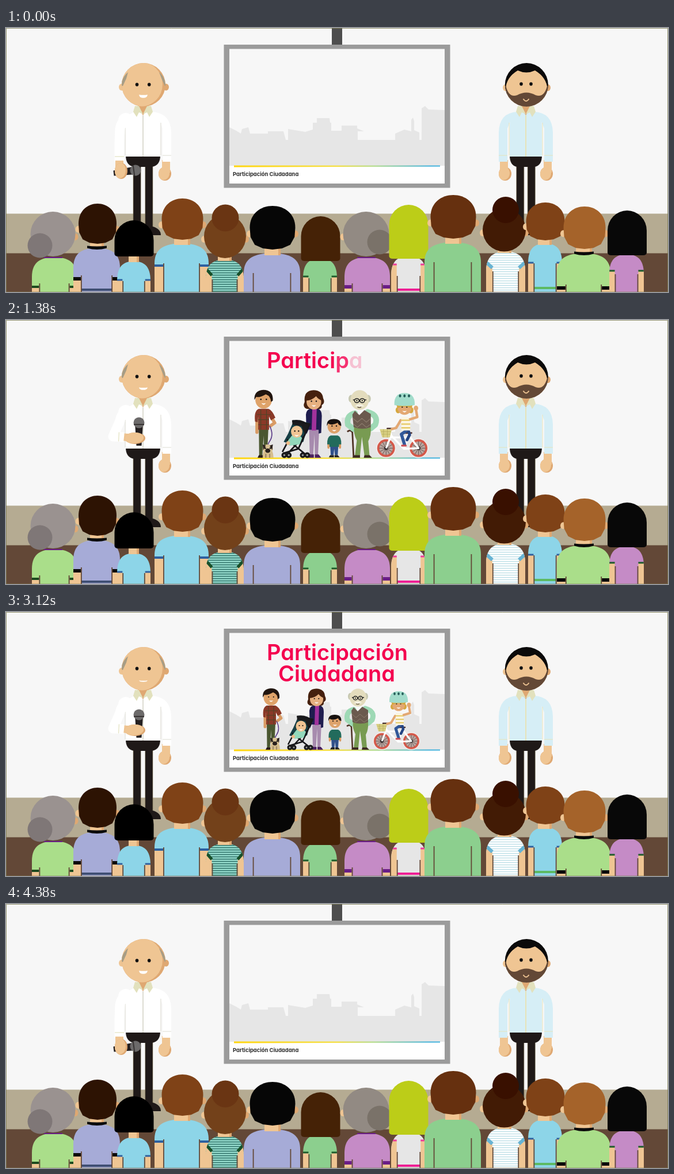
Animation, 1150 px wide and 460 px high, one loop 4.5 s. Source, as an HTML page with a canvas:

```html
<!DOCTYPE html>
<html lang="es">
<head>
<meta charset="utf-8">
<title>Participación Ciudadana</title>
<style>
html, body { margin: 0; width: 100%; height: 100%; overflow: hidden; background: #f7f7f7; }
canvas, svg { position: absolute; left: 0; top: 0; width: 1150px; height: 460px; }
text { font-family: Inter, "Open Sans", sans-serif; font-weight: 700; font-feature-settings: "cv11"; }
#title text { font-size: 38px; font-weight: 600; text-anchor: middle; fill: #f4004f; }
</style>
</head>
<body>
<canvas width="1150" height="460"></canvas>
<svg viewBox="0 0 1150 460">
  <text x="394" y="258" font-size="9.4" fill="#2b2b2b">Participación Ciudadana</text>
  <g id="title">
    <text x="575.5" y="83.5"></text>
    <text x="574.5" y="120.5"></text>
  </g>
</svg>
<script>
const ctx = document.querySelector('canvas').getContext('2d');
const title = document.getElementById('title');
const LOOP = 4500, STEP = 30;
const SKIN = '#efc593', SHADE = '#dfa872', FLOOR = '#634837', DARK = '#1f1918', WALL = '#f7f7f7';

const clamp = v => Math.max(0, Math.min(1, v));
const mix = (a, b, k) => a + (b - a) * k;

// Piecewise linear value through [time, value] pairs.
function track(t, keys) {
  if (t <= keys[0][0]) return keys[0][1];
  for (let i = 1; i < keys.length; i++) {
    const [t0, v0] = keys[i - 1], [t1, v1] = keys[i];
    if (t <= t1) return mix(v0, v1, (t - t0) / (t1 - t0));
  }
  return keys[keys.length - 1][1];
}

function fill(color, d) {
  ctx.fillStyle = color;
  ctx.fill(new Path2D(d));
}
function line(color, width, d, cap = 'butt') {
  ctx.strokeStyle = color;
  ctx.lineWidth = width;
  ctx.lineCap = cap;
  ctx.lineJoin = 'round';
  ctx.stroke(new Path2D(d));
}
function box(color, x, y, w, h) {
  ctx.fillStyle = color;
  ctx.fillRect(x, y, w, h);
}
function oval(color, x, y, rx, ry = rx) {
  ctx.fillStyle = color;
  ctx.beginPath();
  ctx.ellipse(x, y, rx, ry, 0, 0, 7);
  ctx.fill();
}
function clipped(d, draw) {
  ctx.save();
  ctx.clip(new Path2D(d));
  draw();
  ctx.restore();
}
const ovalPath = (x, y, rx, ry) =>
  `M${x - rx} ${y}a${rx} ${ry} 0 1 1 ${2 * rx} 0a${rx} ${ry} 0 1 1 ${-2 * rx} 0Z`;

// ---------- room and screen ----------
function room() {
  box(WALL, 0, 0, 1150, 324);
  box('#b5ab92', 0, 323.5, 1150, 70);
  box(FLOOR, 0, 392.5, 1150, 68);
  box('#4e4e4e', 566, 0, 18, 30);
  box('#9b9b9b', 378.5, 29, 393, 249.5);
  box(WALL, 388, 36.5, 374, 234.5);
  fill('#e6e6e6', `M388 173L400 179 408 184 410 176 421 173 424 184H455V180H482L486 195H490V176L520 181
    533 177V165H540V157H562L563 165H565V179H583V170H610V175L622 180H611V195H676V184L692 177 704 180V160
    L707 156 709 162V178L718 182V195H722V140L728 136 734 142 762 143V241H388Z`);
  box('#fff', 388, 240, 374, 31);
  const g = ctx.createLinearGradient(396, 0, 754, 0);
  g.addColorStop(0, '#ffd60f');
  g.addColorStop(0.5, '#f5e04d');
  g.addColorStop(0.68, '#b6dd90');
  g.addColorStop(0.95, '#45b3dc');
  fill(g, 'M396 239.5H754V241.5L396 242.5Z');
}

// ---------- family on the screen ----------
function smallFace(x, y, r, skin) {
  oval(skin, x, y, r, r * 1.05);
  oval('#111', x - r * .33, y - 1, 1.1);
  oval('#111', x + r * .33, y - 1, 1.1);
  fill('#fff', `M${x - 3.5} ${y + 5}q3.5 1 7 0q-3.5 5 -7 0`);
}

function dogWalker() {
  fill('#4a5730', 'M453 193H468L466 237H461L460.5 205 458.5 237H453.5Z');
  fill('#2a1c18', 'M453 236H460V240H451ZM461 236H466L470 240H461Z');
  line('#d99b64', 5, 'M450 180V200M473 177L478 185 471 190', 'round');
  fill('#8a3928', 'M453 163H468Q474 165 479 177L472 181 469 175V196H452V175L451 184 447 183Q445 166 453 163Z');
  line('#4c4427', 1, 'M456 164V196M465 164V196M450 172H472M452 180H469M452 188H469');
  smallFace(460.5, 149, 13, '#dfa36a');
  fill('#21150f', 'M446 149Q445 134 460 133 476 133 475 150L472 152Q472 143 464 140 453 146 449 144Z');
  line('#5b3b88', 1.5, 'M470 190Q477 204 470 214 466 220 467 226');
  fill('#d5bd8d', 'M459 240Q459 225 467 222 476 227 476 240Z');
  oval('#d9c394', 467, 226, 8, 7);
  fill('#2a211d', 'M459 219L464 221 460 228ZM475 219L470 221 474 228Z');
  oval('#2a211d', 467, 229, 4, 3.5);
  oval('#111', 463, 225, 1.3);
  oval('#111', 471, 225, 1.3);
  line('#6d5a45', 1, 'M464 234V240M470 234V240');
}

function mother() {
  fill('#a78bae', 'M532 193H548L546 236H541L540.5 203 538.5 236H533Z');
  fill('#4b225f', 'M532 235H539.5V240H529ZM541 235H547L551 240H541Z');
  fill('#46210f', `M528 163Q521 160 525 152 523 134 539 133.5 553 134 554 146 558 154 552 157 553 164 544 164Z`);
  fill('#1e1c4e', 'M534 163H546Q552 165 552 174L551 201 547 202V196H531L528 203 527 172Q528 164 534 163Z');
  fill('#a0329c', 'M537 163H544L543 197H536Z');
  smallFace(539.5, 152, 11.5, '#e6b080');
  fill('#46210f', 'M527 150Q529 138 540 139 552 140 553 150 546 148 543 143 536 150 527 150Z');
}

function stroller() {
  fill('#173f45', 'M506 186L531 184 523 215 507 220 492 215 499 202Z');
  fill('#1b1b1d', 'M505 181Q522 178 533 189L526 204 520 190 506 188Z');
  line('#17171a', 2.5, 'M506 182L533 187 515 226 492 233M497 211L528 236M524 206L496 236M490 231L499 214');
  fill('#92d8bb', 'M505 205Q515 201 521 209L517 219 501 221 498 214Z');
  oval('#edb988', 499, 217, 3);
  smallFace(512.5, 199, 9, '#f0c493');
  for (const x of [493, 500, 522, 529]) {
    oval('#19191b', x, 236, 4.5);
    oval('#999', x, 236, 1.5);
  }
}

function boy() {
  fill('#30518a', 'M565 220H578L577 236H572.5L571.5 226 570.5 236H566Z');
  fill('#222', 'M565 236H571V239.5H563ZM572 236H577L580 239.5H572Z');
  line('#d99b64', 3.5, 'M562.5 217V224M580.5 217V224', 'round');
  fill('#226b5c', 'M566 205H577Q583 207 582.5 219H579V223H564V219H560.5Q560 207 566 205Z');
  smallFace(571.5, 191, 10.5, '#dda26b');
  fill('#17120f', 'M560 190Q559 179 571 179 583 179 582.5 190 578 189 577 185 568 190 562 186Z');
}

function oldMan() {
  line('#4c3022', 2.5, 'M592 199Q597 195 600 200L602 240');
  line('#9ed9b5', 9, 'M604 170Q590 173 593 188L602 195M624 168Q642 173 636 188L629 194', 'round');
  fill('#789b52', 'M603 191H629Q630 205 625 214L627 237H619L615 207 612 237H604L607 213Q601 201 603 191Z');
  fill('#3c2b22', 'M603 236H612V240H600ZM619 236H627L631 240H618Z');
  fill('#6b5a4e', 'M604 166L611 173 619 165 629 171V192Q616 197 602 192L600 172Z');
  line('#8d7c6d', 1, 'M601 178L608 184 615 178 622 184 629 178M602 187L608 192 615 186 622 192 629 187');
  oval('#c7c8b1', 598, 147, 4, 6);
  oval('#c7c8b1', 625, 147, 4, 6);
  oval('#e3dcbd', 611.5, 149, 14.5, 15.5);
  line('#222', 1.4, ovalPath(607, 150, 3.7, 3.2) + ovalPath(615.5, 150, 3.7, 3.2) + 'M601 149H603M619 149H622');
  oval('#111', 607, 150, 1);
  oval('#111', 615.5, 150, 1);
  fill('#f4f1e4', 'M604 159Q611 152 619 159 611 159 604 159Z');
  line('#4b3a30', 1, 'M608 160Q611 162 614 160');
}

function cyclist() {
  for (const x of [653, 704]) {
    oval('#f2ecea', x, 225, 15.5);
    oval('#d5594a', x, 225, 14);
    oval('#b9a6a0', x, 225, 10.5);
    for (let a = 0; a < 6; a++) {
      const dx = 11 * Math.cos(a * Math.PI / 6), dy = 11 * Math.sin(a * Math.PI / 6);
      line('#5d4c49', .8, `M${x - dx} ${225 - dy}L${x + dx} ${225 + dy}`);
    }
    oval('#3a3030', x, 225, 3);
  }
  line('#fff', 3, 'M653 225L661 205 681 226 704 225 689 205 681 226M661 205L659 196M661 208H689L687 201');
  line('#4a3030', 2.5, 'M655 194H663M682 201H693', 'round');
  fill('#d9d083', 'M643 195H662L659 208H647Z');
  line('#b4aa5d', .7, 'M645 199H661M646 203H660M649 195V208M655 195V208');
  line('#315899', 5, 'M686 197L677 203 682 219', 'round');
  line('#244583', 4.5, 'M688 197L690 204 686 212', 'round');
  line('#c94d55', 3, 'M678 221H684', 'round');
  oval('#d5a73f', 672, 165, 4, 5);
  oval('#d5a73f', 692, 165, 4, 5);
  line('#e3a873', 4, 'M676 181L669 193 662 195M689 180L702 176 700 164', 'round');
  oval('#e3a873', 700, 162, 3.5, 4);
  fill('#fbf4df', 'M677 176H687Q692 181 691 197H677Z');
  line('#e0bd43', 1.6, 'M677 181H690M677 187H691M677 193H691');
  smallFace(682, 161, 11, '#e3a873');
  fill('#d5a73f', 'M669 156H695L693 162Q681 156 671 162Z');
  fill('#a2dccb', 'M666 157Q665 138 682 138 699 138 698 157Q682 160 666 157Z');
  for (const x of [675, 682, 689]) oval('#245c58', x, 142.5, 1.8, 2.4);
}

function family(t) {
  const u = clamp((t - 4080) / 300);
  const s = t < 3000
    ? track(t, [[1200, 0], [1290, .847], [1350, 1.14], [1470, 1]])
    : 1 - u * u;
  if (s <= 0) return;
  ctx.save();
  ctx.translate(584, 241);
  ctx.scale(s, s);
  ctx.translate(-584, -241);
  [dogWalker, mother, stroller, boy, oldMan, cyclist].forEach(draw => draw());
  ctx.restore();
}

// ---------- speakers ----------
function eyes(xs, y, t, start) {
  const open = [.5, .12, .5][(t - start) / STEP] || 1;
  for (const x of xs) oval('#111', x, y, 2.8, 3.1 * open);
}

function hand(x, y, rx = 11, ry = 12) {
  oval(SHADE, x, y, rx, ry);
  clipped(ovalPath(x, y, rx, ry), () => oval(SKIN, x - 3, y - 1, rx, ry));
}

// Body from collar to shoes, w is half its width; the left arm is optional.
function speaker(c, w, shirt, trim, leftArm) {
  const hip = w - 19, leg = w * .345;
  for (const x of [c - leg, c + leg - 13]) {
    box(DARK, x, 235, 13, 118);
    line('#6d6243', .6, `M${x} 240V353M${x + 13} 240V353`);
  }
  fill(DARK, `M${c + 4} 346H${c + 17}Q${c + 31} 350 ${c + 31} 361H${c + 4}Z`);
  fill(DARK, `M${c - hip} 222H${c + hip}Q${c + hip} 240 ${c + 15} 242H${c - 15}Q${c - hip} 240 ${c - hip} 222Z`);
  for (const k of leftArm ? [-1, 1] : [1]) {
    hand(c + (w - 11) * k, 254);
    box(SKIN, c + (w - 9) * k - 7, 230, 14, 22);
    fill(shirt, `M${c + 14 * k} 146Q${c + (w - 1) * k} 147 ${c + w * k} 182V233H${c + (w - 15) * k}V175L${c + hip * k} 165Z`);
    line(trim, 1, `M${c + (w - 15) * k} 222H${c + w * k}`);
  }
  fill(shirt, `M${c - 12} 146H${c + 12}Q${c + hip} 148 ${c + hip} 172V224H${c - hip}V172Q${c - hip} 148 ${c - 12} 146Z`);
  line(trim, 1, `M${c - hip - 1} 165V222M${c + hip + 1} 165V222`);
  line(trim, 2, `M${c} 152V224`);
  fill(SHADE, `M${c - 9} 128H${c + 9}V140L${c} 152 ${c - 9} 140Z`);
  fill('#e2e1bd', `M${c - 14} 136L${c - 7} 136 ${c} 150 ${c - 7} 147 ${c - 11} 155 ${c - 17} 146Z
    M${c + 14} 136L${c + 7} 136 ${c} 150 ${c + 7} 147 ${c + 11} 155 ${c + 17} 146Z`);
}

// elbow, wrist, hand, hand radii, mic tail, mic head
const POSES = [
  [197, 200, 197, 233, 200, 249, 11, 14, 187, 253, 225, 248],
  [192, 212, 202, 232, 214, 242, 14, 12, 207, 251, 237, 230],
  [186, 203, 205, 204, 224, 206, 18, 10, 231, 219, 231, 179]
];

function micArm(t) {
  const p = track(t, [[930, 0], [1050, 1], [1140, 2], [4080, 2], [4170, 1], [4350, 0]]);
  const i = Math.min(1, Math.floor(p));
  const [ex, ey, wx, wy, hx, hy, rx, ry, tx, ty, mx, my] =
    POSES[i].map((v, n) => mix(v, POSES[i + 1][n], p - i));
  line('#fff', 17, `M207 160Q199 166 198 176L${ex} ${ey} ${wx} ${wy}`);
  oval('#fff', 208, 161, 13, 13);
  const a = Math.atan2(my - ty, mx - tx);
  ctx.save();
  ctx.translate(mx, my);
  ctx.rotate(a);
  const len = Math.hypot(mx - tx, my - ty);
  fill('#241f20', `M0 -7L${-len} -4.5V4.5L0 7Z`);
  oval('#6c6a6a', 0, 0, 9.5);
  line('#383434', 2, 'M-3 -9V9');
  ctx.restore();
  if (p > .5) line(SKIN, 13, `M${wx} ${wy}L${hx} ${hy}`);
  else box(SKIN, wx - 7, wy - 2, 14, 14);
  hand(hx, hy, rx, ry);
  const dx = wx - ex, dy = wy - ey, d = Math.hypot(dx, dy);
  const cx = wx - dx / d * 9, cy = wy - dy / d * 9, nx = dy / d * 8, ny = -dx / d * 8;
  line('#e2e1bd', 1.2, `M${cx - nx} ${cy - ny}L${cx + nx} ${cy + ny}`);
}

function presenter(t) {
  speaker(238, 49, '#fff', '#dddcd2', false);
  micArm(t);
  oval(SKIN, 201, 103, 5, 6);
  oval(SHADE, 278, 103, 5, 6);
  const head = ovalPath(239, 99, 38, 38);
  fill(SHADE, head);
  clipped(head, () => {
    oval(SKIN, 234, 98, 38, 39);
    fill('#a79d85', 'M199 100Q203 84 212 77L209 88 203 101ZM278 100Q275 84 266 77L271 90 276 101Z');
  });
  eyes([227.5, 248.7], 98.5, t, t < 2000 ? 450 : 3240);
  const talking = t > 1137 && t < 3882;
  const open = talking ? (1 - Math.cos((t - 1290) / 305 * 2 * Math.PI)) / 2 : 1;
  const top = 119.3 - 3 * open;
  fill('#fff', `M231 ${top}Q238.5 ${top + 1} 246 ${top}Q245 121.8 238.5 121.8 232 121.8 231 ${top}Z`);
}

function colleague(t) {
  speaker(903, 47, '#d6eef6', '#e6e3b9', true);
  oval(SKIN, 868, 104, 5, 6);
  oval(SHADE, 941, 104, 5, 6);
  const head = ovalPath(904.3, 99, 37.5, 38);
  fill('#0b0a0a', head);
  clipped(head, () => {
    fill(SKIN, 'M868 106Q869 86 889 74Q904 81 919 74Q939 86 940.5 106L930 140H878Z');
    fill('#634836', 'M865 101L868.5 101Q873 122 888 117 904 108 920 117 935 122 940 101L944 101V140H866Z');
  });
  line(SKIN, 1.8, 'M898.5 123.5Q903.5 131 908.5 123.5');
  eyes([895, 912], 97.5, t, t < 2000 ? 960 : 3660);
}

// ---------- audience ----------
function body(x, y, w, color, o = {}) {
  const a = w * .16, r = x + w, e = w * .36;
  const shape = `M${x} 462V${y + 34}C${x} ${y + 13} ${x + w * .12} ${y + 3} ${x + e} ${y}H${r - e}` +
    `C${r - w * .12} ${y + 3} ${r} ${y + 13} ${r} ${y + 34}V462Z`;
  fill(color, shape);
  clipped(shape, () => {
    if (o.stripe) for (let s = y + 2; s < 460; s += 4) box(o.stripe, x, s, w, 1.2);
    if (o.hem) box(o.hem, x + a, o.hemY || 454, w - 2 * a, 4);
    if (!o.cuff) return;
    const tilt = o.tilt || 0;
    for (const [out, inn] of [[x, x + a], [r, r - a]]) {
      fill(SKIN, `M${out} ${o.cuffY}L${inn} ${o.cuffY + tilt}V462H${out}Z`);
      line(o.cuff, o.thick || 4, `M${out} ${o.cuffY}L${inn} ${o.cuffY + tilt}`);
    }
  });
  const top = Math.max(y + 34, (o.cuffY || 0) - 6);
  box(FLOOR, x + a, top, 1.8, 460 - top);
  box(FLOOR, r - a - 1.8, top, 1.8, 460 - top);
}

function neck(x, y, h, w = 24) {
  box(SKIN, x - w / 2, y, w, h);
  box(SHADE, x + w / 2 - 4, y, 4, h);
}
function collar(x, y) {
  fill('#0b0b0b', `M${x - 17} ${y}Q${x} ${y + 2} ${x + 17} ${y}V${y + 4}Q${x} ${y + 9} ${x - 17} ${y + 4}Z`);
}
function ears(x, y, d, sides = [-1, 1]) {
  for (const k of sides) oval(k < 0 ? SKIN : SHADE, x + d * k, y, 5, 6);
}
// Short hair seen from behind.
function crop(color, x, y, rx, ry) {
  ears(x, y + ry * .28, rx + .5);
  fill(color, `M${x - rx} ${y}C${x - rx} ${y - ry * 1.33} ${x + rx} ${y - ry * 1.33} ${x + rx} ${y}
    L${x + rx * .97} ${y + ry * .42} ${x + rx * .78} ${y + ry * .78} ${x + rx * .42} ${y + ry * .95} ${x} ${y + ry}
    ${x - rx * .42} ${y + ry * .95} ${x - rx * .78} ${y + ry * .78} ${x - rx * .97} ${y + ry * .42}Z`);
}
// Long hair with a straight lower edge.
function bob(color, x, y, h) {
  fill(color, `M${x} ${y + h - 4}V${y + 35}a34 35 0 0 1 68 0V${y + h - 4}q-1 4 -6 4h-56q-5 0 -6 -4Z`);
}
function bun(hair, x, y, rx, ry, knot, bx, by, br, sides) {
  ears(x, y + 5, rx, sides);
  oval(hair, x, y, rx, ry);
  oval(knot, bx, by, br);
}

function handUp(pose) {
  if (pose === 1) {
    fill(SKIN, 'M494 404Q500 400 514 402L514 406 497 408Z');
    fill('#a6abd7', 'M496 405H513L510 413 497 413Z');
  } else {
    line(SKIN, 11, 'M506 396L502 318');
    line(SHADE, 3, 'M510 396L506 322');
    oval(SKIN, 501.5, 313, 8, 11);
    line('#a6abd7', 15, 'M497 420L505 388');
  }
}

function audience(t) {
  const raised = t >= 120 && t < 810 ? (t === 120 || t === 780 ? 1 : 2) : 0;

  body(45, 400, 78, '#aade8a', { cuff: '#1d4b1f', cuffY: 451 });
  line('#6a1d87', 2, 'M66 400H98');
  bun('#9a9290', 81.5, 359, 39, 39, '#7f7777', 59, 379, 21.5, [1]);

  body(117, 384, 81, '#a6abd7', { cuff: '#0b0b0b', cuffY: 437, thick: 6, hem: '#3f4f74', hemY: 454 });
  neck(158, 366, 16);
  collar(158, 379.5);
  crop('#2d1303', 159, 341, 33, 35);

  body(193, 407, 58, '#8dd5e8', { cuff: '#2e609f', cuffY: 439, thick: 3 });
  neck(222, 396, 12, 18);
  bob('#000', 188.5, 335, 63);

  body(258, 376, 94, '#8dd5e8', { cuff: '#2e609f', cuffY: 414 });
  neck(306, 362, 16, 28);
  crop('#7f4217', 306.5, 333, 36, 36);

  body(347, 404, 66, '#90d6c8', { stripe: '#22645c', cuff: '#17502a', cuffY: 419, tilt: 12, thick: 5 });
  neck(380, 394, 12);
  bun('#73411a', 380.5, 363, 36.5, 38, '#6a3513', 381, 331, 23.5);

  ctx.save();
  if (raised) ctx.clip(new Path2D('M0 0H498V460H0Z'));
  body(413, 393, 98, '#a6abd7');
  ctx.restore();
  neck(463, 376, 20, 28);
  crop('#060606', 463, 348, 39.5, 38);
  if (raised) handUp(raised);

  body(516, 402, 59, '#8ccf8e', { cuff: '#1d5c2c', cuffY: 433, thick: 3 });
  bob('#452206', 512.5, 328, 78);

  body(588, 400, 79, '#c58bc6', { cuff: '#6a1d87', cuffY: 451, thick: 6 });
  line('#6a1d87', 2, 'M610 400H642');
  bun('#928a83', 625.5, 359, 40, 39, '#7a7269', 649, 373, 21.5, [-1]);

  body(669, 398, 61, '#e6e6e6', { cuff: '#ee3b9b', cuffY: 412, thick: 3, hem: '#ee1f94' });
  bob('#bccd18', 665.5, 308, 94);

  body(727, 374, 98, '#8ccf8e');
  neck(777, 360, 16, 28);
  crop('#66300f', 777, 329, 39.5, 38);

  body(834, 390, 68, '#fff', { stripe: '#b5dbe3', cuff: '#67b3d3', cuffY: 408, tilt: 10, thick: 6 });
  neck(866, 382, 10);
  bun('#421b05', 865.5, 352, 37.5, 37.5, '#391000', 868, 317, 23);

  body(907, 376, 59, '#8dd5e8', { cuff: '#2e609f', cuffY: 409, thick: 3, hem: '#5cba62', hemY: 451 });
  neck(936, 362, 16);
  crop('#7f4217', 937, 337, 33.5, 33);

  body(957, 393, 93, '#aade8a', { cuff: '#0b0b0b', cuffY: 453, thick: 6 });
  neck(1004, 376, 16, 28);
  collar(1004, 389.5);
  crop('#a5632a', 1005, 348, 36.5, 37);

  body(1048, 395, 60, '#c58bc6', { cuff: '#1d5c2c', cuffY: 423, thick: 3 });
  bob('#080808', 1045, 318, 78);
}

// ---------- title ----------
const LINES = [['Participación', 1185], ['Ciudadana', 1620]];
const letters = [];
LINES.forEach(([word, start], n) => [...word].forEach((ch, i) => {
  const el = document.createElementNS('http://www.w3.org/2000/svg', 'tspan');
  el.textContent = ch;
  title.children[n].append(el);
  letters.push({ el, at: start + 26.25 * i });
}));

function heading(t) {
  const s = track(t, [[4110, 1], [4380, 1.18]]);
  title.setAttribute('transform', `translate(575 90) scale(${s}) translate(-575 -90)`);
  title.setAttribute('opacity', 1 - clamp((t - 4200) / 180));
  for (const { el, at } of letters) el.setAttribute('fill-opacity', clamp((t - at) / 45 + .55));
}

function draw(now) {
  const t = Math.floor(now % LOOP / STEP) * STEP;
  ctx.clearRect(0, 0, 1150, 460);
  room();
  family(t);
  presenter(t);
  colleague(t);
  audience(t);
  ctx.strokeStyle = 'rgba(128,128,84,.8)';
  ctx.lineWidth = 1;
  ctx.strokeRect(.5, .5, 1149, 459.5);
  heading(t);
}

const start = performance.now();
function tick() {
  draw(performance.now() - start);
  requestAnimationFrame(tick);
}
tick();
</script>
</body>
</html>
```
